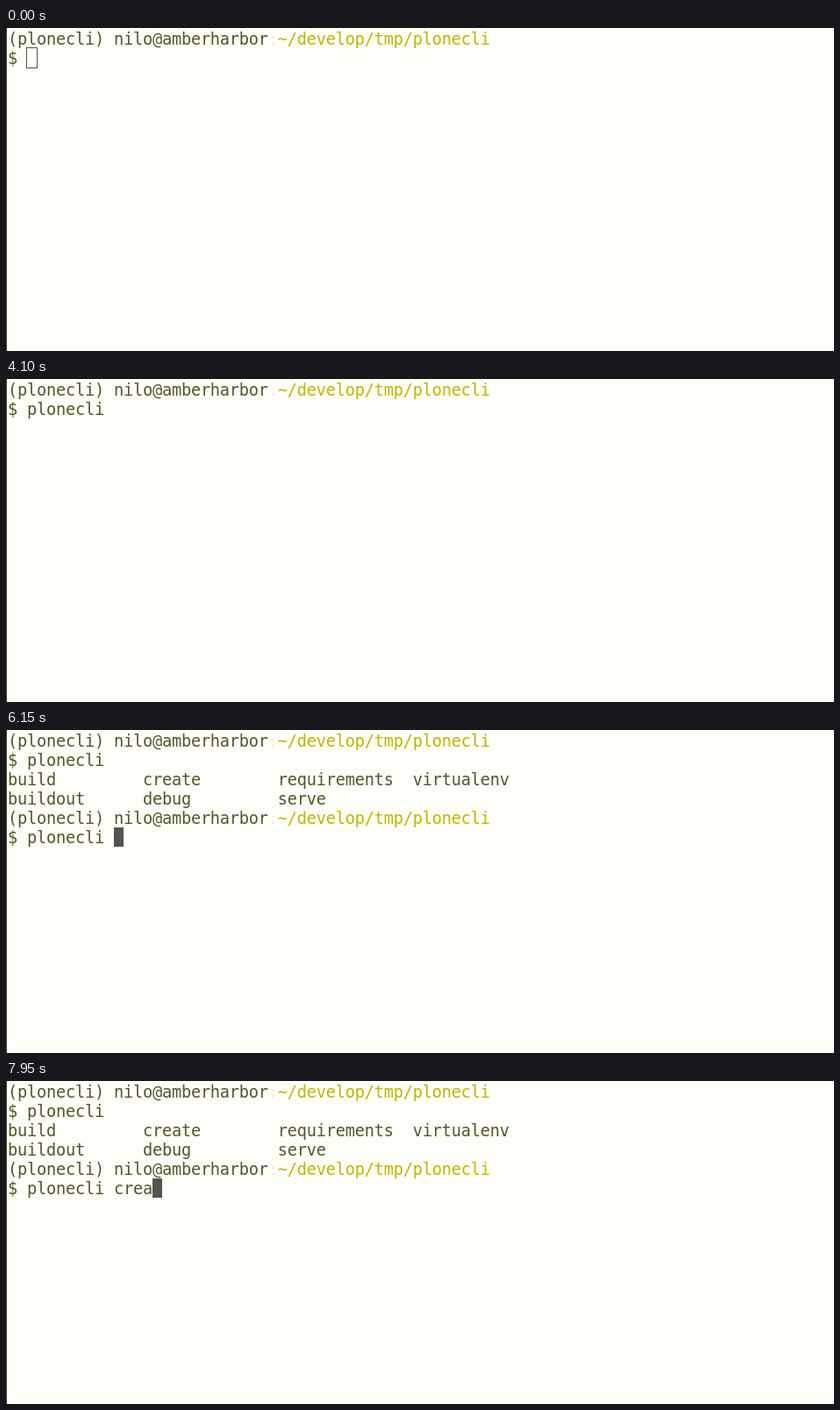
These frames come from a looping animation (944 by 368 pixels, 8 s). An HTML page:

```html
<!DOCTYPE html>
<html lang="en">
<head>
<meta charset="utf-8">
<title>Terminal</title>
<style>
  html, body { margin: 0; width: 100%; height: 100%; overflow: hidden; background: #fffffa; }
  svg { display: block; }
  text {
    font: 18.667px "DejaVu Sans Mono", monospace;
    letter-spacing: -.238px;
    white-space: pre;
    fill: #55552a;
  }
  .colon { fill: #efefd2; }
  .path { fill: #c0b400; }
  .edge { fill: #3c3c14; }
  .block { fill: #545450; }
  .hollow { fill: none; stroke: #55553c; }
</style>
</head>
<body>
<svg width="944" height="368" viewBox="0 0 944 368">
  <rect class="edge" width="1" height="368"/>
  <g id="screen"></g>
  <rect id="block" class="block" width="11" height="22"/>
  <rect id="hollow" class="hollow" width="12" height="23"/>
</svg>
<script>
const LOOP = 8000, CELL_W = 11, CELL_H = 22, LEFT = 2, TOP = 1, ASCENT = 18;
const FOCUS = 150, LISTING = 5800, BLINK = 600;

const firstKeys = [1900, 2100, 2300, 2500, 2630, 2760, 2890, 3020, 3150];
const lastKeys = [7050, 7300, 7550, 7800];
const tabs = [5550, LISTING, 6150];
const resets = [FOCUS, ...firstKeys, ...tabs, ...lastKeys];

const $ = id => document.getElementById(id);
const screen = $('screen'), block = $('block'), hollow = $('hollow');

const prompt = '(plonecli) nilo@amberharbor<tspan class="colon">:</tspan>' +
  '<tspan class="path">~/develop/tmp/plonecli</tspan>';
const columns = (...words) => words.map(w => w.padEnd(14)).join('').trimEnd();
const listing = [
  columns('build', 'create', 'requirements', 'virtualenv'),
  columns('buildout', 'debug', 'serve')
];

const pressed = (keys, t) => keys.filter(k => k <= t).length;
const typed = (word, keys, t) => word.slice(0, pressed(keys, t));

function place(rect, col, row, dx = 0, dy = 0) {
  rect.setAttribute('x', LEFT + col * CELL_W + dx);
  rect.setAttribute('y', TOP + row * CELL_H + dy);
}

function show(el, on) {
  el.style.visibility = on ? 'visible' : 'hidden';
}

let shown = '';
function render(t) {
  let input = '$ ' + typed('plonecli ', firstKeys, t);
  const lines = [prompt, input];
  if (t >= LISTING) {
    input += typed('crea', lastKeys, t);
    lines.push(...listing, prompt, input);
  }

  const html = lines.map((line, row) =>
    `<text x="${LEFT}" y="${TOP + ASCENT + row * CELL_H}">${line}</text>`).join('');
  if (html !== shown) screen.innerHTML = shown = html;

  const row = lines.length - 1;
  place(block, input.length, row);
  place(hollow, input.length, row, -.5, -.5);

  // The blink restarts with every key press.
  const focused = t >= FOCUS;
  const since = t - resets[pressed(resets, t) - 1];
  show(hollow, !focused);
  show(block, focused && since % (2 * BLINK) < BLINK);
}

const start = performance.now();
function tick() {
  render((performance.now() - start) % LOOP);
  requestAnimationFrame(tick);
}
tick();
</script>
</body>
</html>
```
